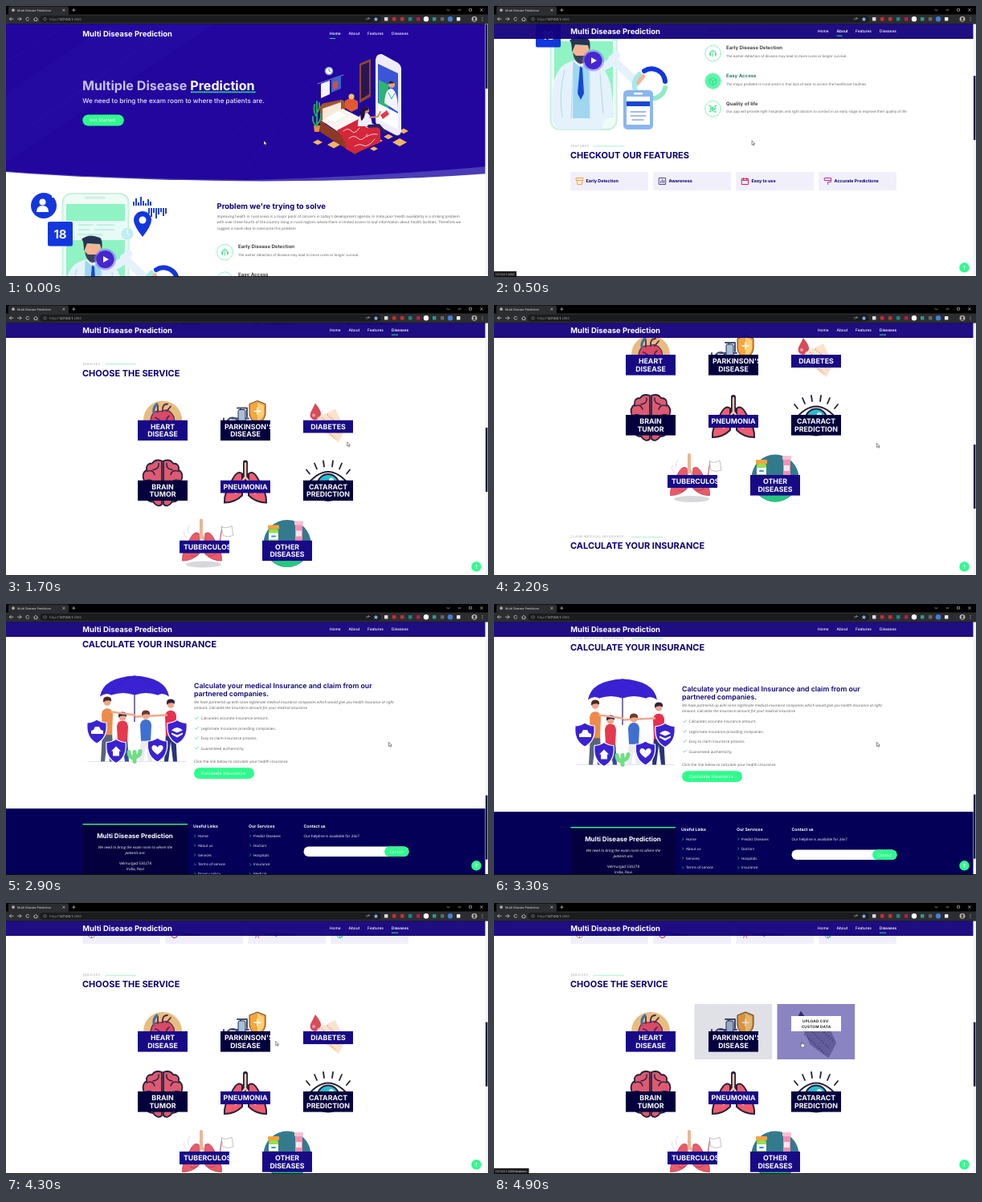
Write an HTML page that moves like this. It is 600x338 px and loops after 5 s.

```html
<!DOCTYPE html>
<html lang="en">
<head>
<meta charset="utf-8">
<title>Multi Disease Prediction</title>
<style>
html, body { margin: 0; width: 100%; height: 100%; overflow: hidden; background: #fff; }
svg { display: block; }
#stage { position: absolute; left: 0; top: 0; }
text { font-family: Inter, sans-serif; font-weight: 700; text-rendering: geometricPrecision; white-space: pre; }
.m { font-weight: 500; }
.s { font-weight: 600; }
.o { font-family: "Open Sans", sans-serif; font-weight: 400; }
.it { font-style: italic; }
.c { text-anchor: middle; }
</style>
</head>
<body>
<svg id="stage" width="600" height="338" viewBox="0 0 600 338"></svg>
<script>
const BLUE = '#22069e', INK = '#180a86', HEAD = '#0b0072', NAVY = '#04003d', GREEN = '#2ffb8d', GREY = '#5c5c5c';

// y is the middle of the line of text
const text = (x, y, str, size, fill = '#fff', cls = '', more = '') =>
  `<text x="${x}" y="${y + size * 0.36}" font-size="${size}" fill="${fill}" class="${cls}" ${more}>${str}</text>`;
const box = (x, y, w, h, fill, more = '') =>
  `<rect x="${x}" y="${y}" width="${w}" height="${h}" fill="${fill}" ${more}/>`;
const dot = (x, y, r, fill, more = '') => `<circle cx="${x}" cy="${y}" r="${r}" fill="${fill}" ${more}/>`;
const path = (d, fill, more = '') => `<path d="${d}" fill="${fill}" ${more}/>`;
const line = (d, color, w = 1) => path(d, 'none', `stroke="${color}" stroke-width="${w}" stroke-linecap="round" stroke-linejoin="round"`);
const at = (x, y, s) => `<g transform="translate(${x} ${y})">${s}</g>`;
const group = (id, s) => `<g id="${id}">${s}</g>`;
const pill = (x, y, w, h, fill) => box(x, y, w, h, fill, `rx="${h / 2}"`);

function browser() {
  const ext = ['#ddd', '#d8262c', '#c9302c', '#138a8a', '#c2184a', '#fff', '#2c9c8c', '#666', '#3f7fd8', '#eee'];
  return box(0, 0, 600, 22.3, '#000') + box(3, 0.5, 75, 11, '#2c2d30', 'rx="2"') + box(0, 10.5, 600, 11.8, '#2c2d30') +
    dot(9, 5.2, 1.9, '#aaa') + text(14, 5.3, 'Multi Disease Prediction', 3.75, '#eee', 'o') +
    line('M70.7 4l2.4 2.4m0-2.4l-2.4 2.4M82.5 5.2h3.6m-1.8-1.8v3.6', '#ddd', 0.6) +
    line('M563 5h3M577 3.6h2.6v2.6h-2.6zM590.5 3.6l2.8 2.8m0-2.8l-2.8 2.8M549 4.5l1.5 1.5 1.5-1.5', '#ddd', 0.6) +
    pill(42, 12, 425, 8.8, '#1b1c1e') +
    line('M9 16.2H4.5m2-2l-2 2 2 2M14.5 16.2H19m-2-2l2 2-2 2', '#ddd', 0.7) +
    line('M28.6 15.2a2 2 0 1 0 .1 2M34.5 16.5l2.5-2.3 2.5 2.3m-4.3 0v2h3.6v-2', '#ddd', 0.7) +
    dot(48.5, 16.3, 1.7, 'none', 'stroke="#aaa" stroke-width=".5"') +
    text(54, 16.3, 'http://<tspan fill="#fff">127.0.0.1</tspan>:2000', 4.1, '#999', 'o') +
    line('M449 17.5v-2h3.5m-1.3-1.3l1.3 1.3-1.3 1.3', '#aaa', 0.6) +
    path('M460.5 13.4l.9 2 2 .2-1.5 1.4.5 2-1.9-1-1.9 1 .5-2-1.5-1.4 2-.2z', '#8ab4f8') +
    ext.map((c, i) => i == 5 || i == 8 ? dot(473 + i * 10, 16.3, 3.2, c) : box(471 + i * 10, 14, 4.4, 4.6, c, 'rx=".6"')).join('') +
    dot(583, 16.3, 3.4, '#b9b4ad') + dot(583, 15.5, 1.3, '#222') + path('M580.6 18.6q2.4-3 4.8 0z', '#222') +
    [14.4, 16.3, 18.2].map(y => dot(593, y, 0.5, '#ccc')).join('');
}

function heroArt() {
  const gem = (x, y, r) => path(`M${x - r} ${y}l${r}-${r * 0.55} ${r} ${r * 0.55} -${r} ${r * 0.55}z`, '#f2b661');
  return gem(490, 170, 9) + gem(462, 168, 7) + gem(408, 173, 8) + gem(388, 170, 6) + gem(495, 156, 6) + gem(476, 163, 6) + gem(458, 178, 5) +
    path('M460 67q1-8 8-7l20 11q4 3 4 8v77q-1 7-7 5l-21-11q-4-3-4-7z', '#efedfb') +
    path('M463 72l25 12v63l-25-12z', '#3a55d8') + path('M464 92l12 6v31l-12-6z', '#2bb673') + path('M463 121l25 13v20l-25-12z', '#fff') +
    path('M471 121q1-18 9-18 8 3 8 29z', '#f4f4ff') + dot(480, 98, 4, '#e7a07d') + path('M476 97q2-6 8-1z', '#222') + line('M476 108l4 8 4-7', '#27b39f', 1) +
    path('M440 72l14-6v47l-14 8z', '#8a4a2c') + path('M442 74l10-4v40l-10 6z', '#2b1450') +
    line('M388 97l32-11', '#b9b0e8', 0.7) + path('M392 97l11-4v17l-11 5z', '#f3f3ff') + path('M405 92l12-5v16l-12 5z', '#3566c9') + path('M407 95l6-2v9l-6 3z', '#e4463d') +
    dot(402, 81, 5.3, '#8aa1f0') + dot(402, 81, 3.8, '#fff') + line('M402 78.5v2.5l2 1', '#333', 0.6) +
    path('M422 118l8-4 8 5v9l-8 4-8-5z', '#e2582f') + dot(430, 113, 3.5, '#f5c05d') +
    path('M391 126q2-5 6-5l20-4q4 0 5 4v12l-26 14h-5z', '#a5532f') + path('M394 128l23-8v14l-23 9z', '#f7ead8') +
    path('M391 143l43 28 31-17v14l-31 17-43-28z', '#8b3b24') + path('M393 143l26-15 44 22-29 21z', '#fbf5f2') +
    path('M397 140l17-10 11 6-17 10z', '#fff', 'stroke="#ddd" stroke-width=".5"') +
    path('M412 155l27-14 27 12v17l-32 14-11-6q1-9-11-23z', '#d5263a') +
    line('M420 156q6-5 10 0t10-4M427 165q6-5 11 0t12-5M438 149q5-3 9 1t10-1M434 175q6-4 11-1t14-8M449 163q5-4 13-3', '#fbd3d5', 1) +
    path('M438 150q0-16 8-18 9 1 10 18z', '#f1eefb') + dot(448, 130, 4.2, '#dc8e6d') + path('M441 135q0-10 8-10l3 4-5 2q0 10-5 12z', '#23123c') +
    line('M453 139l10-1 3-6', '#dc8e6d', 2) + line('M452 150l12-1 7 8', '#2a2266', 4) + path('M466 136l8-6 3 5-8 6z', '#e2384f') +
    path('M383 149h8l-1 8h-6z', '#ef8b46') + line('M387 150v-31M387 150q-6-4-5-12M387 148q6-6 5-14M387 138q-5-5-3-15M387 133q4-4 3-12', '#24b554', 1.8);
}

function hero() {
  return path('M0 20H600V209Q480 218 320 218.5 130 217 0 207z', '#4a3bb6') +
    path('M0 20H600V200Q470 212 300 217 120 215 0 206z', BLUE) +
    path('M0 110L130 22H260L0 195z', '#2c14a8', 'opacity=".3"') +
    line('M0 70L80 22M30 150L210 22M255 195L345 90M300 200L420 40', '#3a26b4', 0.25) +
    text(95, 99, 'Multiple Disease <tspan fill="#fff">Prediction</tspan>', 16.1, '#c6c0ea') +
    path('M230 107.4H311', 'none', `stroke="${GREEN}" stroke-width="1.7" stroke-dasharray="1.8 .5"`) +
    text(95.3, 118.5, 'We need to bring the exam room to where the patients are.', 8.1, '#eceafa', 'm') +
    pill(95.3, 135.5, 51.5, 14, GREEN) + text(104, 142.5, 'Get Started', 5, '#fff', 'm', 'letter-spacing=".4"') + heroArt();
}

function doctorArt() {
  const bars = [5, 9, 4, 11, 6, 3, 8, 5];
  return box(70.5, 234, 82, 168, '#eefcf6', 'rx="11" stroke="#c9efdf" stroke-width="2"') + box(75, 247, 73, 140, '#8ff3c4') +
    box(98, 237.5, 26, 3, '#d6ebe5', 'rx="1.5"') + box(75, 268, 73, 24, '#e6fbf5') + line('M90 273h18m5 0h22M90 279h14m6 0h24M90 285h30', '#9be4d6', 1) +
    dot(47, 249, 16, '#1237de') + dot(45.5, 244.5, 4, '#fff') + path('M38 257q0-8 7.5-8 7.5 0 7.5 8z', '#fff') + box(57, 232, 7, 7, '#fff') +
    box(52, 269, 31, 30.5, '#1237de', 'rx="2"') + text(67.5, 284.5, '18', 15, '#fff', 'c') +
    path('M170 288q-11-14-11-21a11 11 0 0 1 22 0q0 7-11 21z', '#1237de') + dot(170, 267, 4.5, '#fff') +
    bars.map((h, i) => box(158 + i * 3, 249 - h, 2, h, '#1d42d8') + box(177 + i * 3, 252, 2, h + 2, '#1d42d8')).join('') +
    dot(151, 284, 7.5, '#bdeef0') + line('M151 279v5l3 2', '#fff', 1) +
    path('M73 392q-5-55 13-70 15-10 31-5 20 0 28 28l5 40-14 6-2 11H80z', '#e5f2fb') +
    path('M99 317l9 8 10-9 1 72H98z', '#9ed7ef') + path('M107 323l3 2 2 32-4 8-4-8z', '#1748d2') + line('M88 328q-8 30-3 58M132 332l4 50M99 318l-3 70M119 318v70', '#b4d5e8', 1) +
    path('M98 296q0 20 9 25 9-3 11-23z', '#f4b594') + path('M97 306q0-14-3-15 9-8 23-2 4 3 2 15l-2-7-16-1z', '#293453') + path('M98 306l4 4h12l4-5q-1 14-10 15-8-1-10-14z', '#39435d') +
    line('M122 326q23-1 30-17M147 314l31 30', '#e5f2fb', 10) + line('M178 344l7-8', '#f4b594', 6) +
    dot(123.5, 316, 13.5, '#8a78ef', 'opacity=".6"') + dot(123.5, 316, 11, '#4526d2') + path('M121 312l7 4-7 4z', '#fff') +
    line('M183 361a17 17 0 0 1-2-28', '#a6e9ec', 6) + line('M187 329a17 17 0 0 1 26 13', '#1237de', 6) + line('M213 350a17 17 0 0 1-21 13', '#8feac6', 6) +
    box(161, 353, 37, 49, '#8ab6ef', 'rx="5"') + box(165, 361, 29, 35, '#fff') + box(165, 367, 29, 6, '#1748d2') + line('M170 380h19M170 385h19M172 390h14', '#4a7be0', 1) + box(174, 356, 11, 2.5, '#fff', 'rx="1"');
}

function about() {
  const rows = [
    ['Early Disease Detection', 'The earlier detection of disease may lead to more cures or longer survival.', 'M-4-1Q0-7 4-1M-3 3V0Q0-4 3 0V3M0 0V4M-4 2V0M4 2V0'],
    ['Easy Access', "The major problem in rural area's is that lack of ease to access the healthcare facilities", 'M-4-2L0-4 4-2V3L0 5-4 3ZM-4-2L0 0 4-2M0 0V5'],
    ['Quality of life', 'Our app will provide right hospitals and right doctors to contact in an early stage to improve their quality of life', 'M-4-4Q0-3 4 4 0 5-4-4M4-4Q4 0-4 4-4 0 4-4M-4 0H4']];
  const para = ["Improving health in rural areas is a major point of concern in today's development agenda. In India poor health availability is a striking problem",
    'with over three-fourth of the country living in rural regions where there is limited access to and information about health facilities. Therefore we',
    'suggest a novel idea to overcome this problem'];
  return doctorArt() + text(262.5, 249.3, "Problem we're trying to solve", 9.5, HEAD) +
    para.map((s, i) => text(262.5, 262.5 + i * 7.2, s, 4.56, GREY, 'o')).join('') +
    rows.map(([head, body, icon], i) => {
      const y = 307 + i * 34.6;
      return dot(272.5, y, 9.8, '#fff', `id="ring${i}" stroke="#8af5be" stroke-width="1"`) + at(272.5, y, line(icon, '#35dc8c', 0.9)) +
        text(289, y - 6.8, head, 6.05, '#444', '', `id="head${i}"`) + text(289, y + 3.7, body, 4.38, GREY, 'o');
    }).join('');
}

const section = (y, label, title, x1, x2) =>
  text(95.5, y, label, 3.85, '#999', 'o s', 'letter-spacing=".68"') + line(`M${x1} ${y + 0.4}H${x2}`, '#6fe8ad', 0.6) + text(95, y + 11.4, title, 10.98, HEAD);

function features() {
  const ring = 'M-4 0A4 4 0 1 1 4 0A4 4 0 1 1-4 0';
  const cards = [
    ['Early Detection', '#ffa331', 'M-4-4H4V-1H-4ZM-3-1V4H3V-1'], ['Awareness', '#54479b', 'M-4-4H4V4H-4ZM-2 2V0M0 2V-2M2 2V-1'],
    ['Easy to use', '#d0215f', 'M-4-3H4V4H-4ZM-4-1H4M-2-4V-2M2-4V-2'], ['Accurate Predictions', '#b635a2', 'M-4-4H4V-1H-4ZM4-2V1H0V4'],
    ['Recommendations', '#47aeff', 'M-3-3Q0-5 3-3V3Q0 5-3 3ZM-3-3Q0-1 3-3M-3 0Q0 2 3 0'], ['Doctors', '#ef7466', ring + 'M-1 0H1'],
    ['Hospitals', '#19d9a5', 'M-3-4H2V2H-3ZM-1 4H4V-2'], ['Medicals', '#4233e0', 'M-4 0L0-4 4 0V4H-4ZM-1 1H1'],
    ['Access to care', '#b2904f', 'M0-4V4M-4 0Q-4 4 0 4 4 4 4 0M-2-2H2'], ['Statistics', '#b20969', ring + 'M0 0L2-2'],
    ['Transportation', '#ee5a5c', 'M0-1L-2 4M0-1L2 4M-3-4Q-5-1-3 1M3-4Q5-1 3 1'], ['Multi Disease Prediction', '#29cc81', ring + 'M-4 0H4M0-4V4M-3-3L3 3']];
  const row = r => cards.slice(r * 4, r * 4 + 4).map(([name, color, icon], i) => {
    const x = 95.3 + i * 103, y = 455 + r * 29.5;
    return box(x, y, 96.7, 23, '#f1effa') + at(x + 11.3, y + 11.5, line(icon, color, 1)) + text(x + 19.2, y + 11.5, name, 5.42, HEAD);
  }).join('');
  return section(422.5, 'FEATURES', 'CHECKOUT OUR FEATURES', 124, 162) + [0, 1, 2].map(r => group('row' + r, row(r))).join('');
}

// Pictures sit around the middle of a service cell
const lungs = (fill, edge, w) => path('M-4-12Q-10-17-16-5-27 12-26 24-13 24-4 15zM4-12Q10-17 16-5 27 12 26 24 13 24 4 15z', fill, `stroke="${edge}" stroke-width="${w}"`);
const art = {
  heart: dot(0, 0, 24, '#e6bd7e') + path('M-15 0Q-13-13-2-11 8-16 14-4 17 9 2 21-11 14-15 0z', '#d84a67', 'stroke="#51284d" stroke-width="1.2"') +
    line('M-6-10V-18M0-11q-1-9 6-9M5-11l5-6M-9-3q8 3 10 12M8-5q-5 3-2 10', '#51284d', 1.8) + line('M-11-9q-1-7 4-11', '#3f6dae', 3),
  chair: line('M-27-2V22M-24 23H26M-6-15V10M-10-15H2V-4M-17-2H4', '#45506e', 2) + box(-9, -13, 9, 20, '#a9bfd7', 'rx="2" stroke="#25304d"') + dot(-16, 4, 7, 'none', 'stroke="#45506e" stroke-width="2"') +
    path('M15-24L25-20V-8Q24 1 15 5 6 1 5-8V-20z', '#f5a63c', 'stroke="#59432f" stroke-width="1"') + path('M15-22L23-18V-8Q22-2 15 2z', '#ffd078') + line('M15-15v8m-4-4h8', '#fff', 1.5),
  drop: path('M-16-21Q-8-11-9-7-11 0-17 0-24-2-22-9z', '#d94b59') + dot(-18, -6, 2, '#f49aa1') + path('M-14-3L9-14 21 12 13 28-6 14z', '#f9dcc1', 'opacity=".8"') +
    path('M-8-3L14 18M-1-7L18 10M-12 3L10 24', 'none', 'stroke="#e89b62" stroke-width="2" stroke-dasharray="1 2"'),
  brain: path('M-1-28Q-9-31-13-25-21-25-20-17-27-12-23-3-28 6-21 12-21 23-12 23-6 31-1 26zM1-28Q9-31 13-25 21-25 20-17 27-12 23-3 28 6 21 12 21 23 12 23 6 31 1 26z', '#dc5a72', 'stroke="#262039" stroke-width="1.8"') +
    line('M-5-25q1 7-7 8M-20-15q8-3 10 4M-22-3q8-4 12 4M-19 11q7-6 13 0M-11 22q0-7 6-7M5-25q-1 7 7 8M20-15q-8-3-10 4M22-3q-8-4-12 4M19 11q-7-6-13 0M11 22q0-7-6-7', '#262039', 1.4),
  lungs: line('M0-26V-8L-9 4M0-8L9 4', '#262039', 6) + lungs('#ef5d70', '#262039', 2) + line('M0-25V-8L-9 4M0-8L9 4M-12 0v12M12 0v12', '#fbc9aa', 2.5),
  eye: line('M-23-12l-4-5M-14-18l-3-7M-5-21l-1-7M5-21l1-7M14-18l3-7M23-12l4-5', '#262039', 1.8) +
    path('M-28 4Q0-33 28 4 0 39-28 4z', '#fff', 'stroke="#262039" stroke-width="2"') + dot(0, 2, 13.5, '#2cbcd0', 'stroke="#262039" stroke-width="2"') + dot(0, 2, 6, '#262039') + dot(4, -4, 3, '#d7fbff'),
  sick: '<ellipse cx="-1" cy="28" rx="22" ry="4" fill="#d8d8db"/>' + line('M-4-27V-8L-10 2M-4-8L5 2', '#e8b698', 4) + at(-3, 1, `<g transform="scale(.94)">${lungs('#e85c69', '#c2384d', 0.8)}</g>`) +
    dot(-13, 4, 2, '#fff') + dot(8, 4, 2, '#fff') + line('M-17 17q5 3 9-1M5 17q5 2 9-2M18 8L22-19', '#b8434f', 1) + path('M21-19q6 3 13-1l2 12q-7 3-13 0z', '#fff', 'stroke="#999" stroke-width=".6"') + line('M-22-5q-5-3-3-9m5 3q-2-6 2-10', '#c7c7c7', 0.6),
  pills: dot(0, 0, 29.5, '#347a8d') + path('M-25 14Q0 24 25 14 15 29 0 29.5-16 29-25 14z', '#24c97d') +
    box(-24, -23, 14, 5, '#f3a441', 'rx="1"') + box(-23, -18, 12, 26, '#98df49', 'rx="2"') + box(-23, -13, 12, 8, '#fff') + line('M-19-9h4', '#3c8ed2', 2) +
    box(10, -26, 9, 27, '#f391b2', 'rx="2"') + box(9, -28, 11, 5, '#f9c0d2', 'rx="1"') + box(11, -16, 7, 7, '#ffe4ef')
};
const services = [
  [195, 646, 'heart', INK, ['HEART', 'DISEASE'], 0], [298, 646, 'chair', NAVY, ["PARKINSON'S", 'DISEASE'], 1], [401, 646, 'drop', INK, ['DIABETES'], 0],
  [195, 725, 'brain', NAVY, ['BRAIN', 'TUMOR'], 0], [298, 725, 'lungs', INK, ['PNEUMONIA'], 0], [401, 725, 'eye', NAVY, ['CATARACT', 'PREDICTION'], 0],
  [247, 798, 'sick', INK, ['TUBERCULOSIS'], 1], [350, 800, 'pills', INK, ['OTHER', 'DISEASES'], 0]];

function service([x, y, pic, color, words, long], i) {
  const top = i < 3 ? 646 : i < 6 ? 721 : 796, h = words.length * 9.6 + 6.6;
  const lines = words.map((w, j) => long && !j ? text(5, 8, w, 8.8) : text(31, 8 + j * 9.6, w, 8.8, '#fff', 'c')).join('');
  const tip = (dy, s) => text(x, top - dy, s, 4.7, '#222', 'c', 'letter-spacing=".2"');
  return `<g id="pic${i}">${at(x, y, art[pic])}</g>` + box(x - 48.5, top - 34, 96.7, 69, color, `id="veil${i}" opacity="0"`) +
    `<svg id="name${i}" x="${x - 31}" y="${top}" width="62" height="${h}">${box(0, 0, 62, h, color)}${lines}</svg>` +
    `<g id="tip${i}" opacity="0">${box(x - 31, top - 19, 62, 19, '#fff')}${tip(12.4, 'UPLOAD CSV:')}${tip(5.6, 'CUSTOM DATA')}</g>`;
}

function familyArt() {
  const purple = '#3a22d2';
  const shield = (x, y, icon) => path(`M${x} ${y - 15}q6 4 12 4 2 19-12 26-14-7-12-26 6 0 12-4z`, purple, 'stroke="#fff" stroke-width="1.2"') + at(x, y, icon);
  const person = (x, y, h, shirt, legs, hair) => path(`M${x - 6} ${y + h * 0.5}h12l2 ${h * 0.5}h-5l-3-${h * 0.35}-3 ${h * 0.35}h-5z`, legs) +
    path(`M${x - 6} ${y + h * 0.55}l-1-${h * 0.35}q1-7 7-7t7 7l-1 ${h * 0.35}z`, shirt) + dot(x, y, 4.3, '#f0a78c') + path(`M${x - 5} ${y}q-1-7 5-7t5 6q-5-3-10 1z`, hair);
  const house = path('M-6 0L0-6 6 0H4V6H-4V0z', '#fff'), heart = path('M0 6Q-11-2-5-6-1-6 0-3 1-6 5-6 11-2 0 6z', '#fff'), car = path('M-7 3V-1l3-1 2-4h5l2 4 3 1v4z', '#fff');
  return line('M103 196H224', '#d6d2f3', 0.7) + line('M160 90V146', '#2d1a5c', 1.2) + person(126, 122, 74, '#ee8a4c', '#5a6478', '#4e291f') + person(205, 125, 71, '#e8304e', '#28337c', '#33203a') +
    person(145, 141, 55, '#e6384e', '#334a9c', '#33203a') + person(174, 139, 57, '#3f6fd0', '#e9eaf4', '#6e392b') + line('M131 134l29 4M200 138l-38 2', '#f0a78c', 2.5) +
    path('M117 115Q121 91 160 89 199 91 203 115 196 109 189 113 174 108 160 113 146 108 131 113 124 109 117 115z', purple) +
    line('M131 113Q138 95 160 89 182 95 189 113', '#2d17b4', 0.5) +
    line('M160 196v-12M160 192q-7-1-7-8M160 191q7-2 7-8', '#70df82', 5) + shield(113, 158.5, car) + shield(137, 183, house) + shield(188.5, 181.5, heart) + shield(213, 159, path('M-7-2q7-7 14 0l-7 3zM-7 3l7 4 7-4v-2l-7 3-7-3z', '#fff'));
}

function insurance() {
  const list = ['Calculates accurate insurance amount.', 'Legitimate insurance providing companies.', 'Easy to claim insurance process.', 'Guaranteed authenticity.'];
  return at(0, 834.5, familyArt() + text(234, 101, 'Calculate your medical Insurance and claim from our', 8.74, HEAD, 's') + text(234, 111, 'partnered companies.', 8.74, HEAD, 's') +
    text(234, 122, 'We have partnered up with some legitimate medical insurance companies which would give you health insurance at right', 4.7, GREY, 'o it') +
    text(234, 129, 'amount. Calculate the Insurance amount for your medical insurance', 4.7, GREY, 'o it') +
    list.map((s, i) => line(`M235.5 ${142 + i * 12.4}l1.3 1.3 2.5-2.8`, '#3fd996', 0.8) + text(242.5, 142.3 + i * 12.4, s, 4.7, GREY, 'o')).join('') +
    text(234, 195.5, 'Click the link below to calculate your health insurance', 4.7, GREY, 'o') +
    pill(234, 203.8, 75, 13.6, GREEN) + text(243, 210.6, 'Calculate Insurance', 4.95, '#fff', 'm', 'letter-spacing=".45"'));
}

function footer() {
  const column = (x, head, items) => text(x, 277, head, 5.15) + items.map((s, i) =>
    line(`M${x + 1.6} ${287.5 + i * 11.9}l1.2 1.2-1.2 1.2`, GREEN, 0.6) + text(x + 6, 288.6 + i * 11.9, s, 4.48, '#fff', 'o')).join('');
  const mid = (y, s, it) => text(161, y, s, 4.6, '#fff', 'o c ' + it);
  return at(0, 834.5, box(0, 254.6, 600, 170, '#040057') + box(95.5, 273.5, 130.5, 92, NAVY) + box(95.5, 273.5, 130.5, 1.4, GREEN) +
    text(160.5, 288.6, 'Multi Disease Prediction', 8, '#fff', 'c') +
    mid(303, 'We need to bring the exam room to where the', 'it') + mid(310.3, 'patients are.', 'it') + mid(323, 'Velmurgad 530278', '') + mid(330.3, 'India, Rovi', '') +
    column(233, 'Useful Links', ['Home', 'About us', 'Services', 'Terms of service', 'Privacy policy']) +
    column(302, 'Our Services', ['Predict Diseases', 'Doctors', 'Hospitals', 'Insurance', 'Medical']) +
    text(370.5, 277, 'Contact us', 5.15) + text(370.5, 289.2, 'Our helpline is available for 24x7', 4.55, '#fff', 'o') +
    pill(370.5, 302, 131, 12.5, '#fff') + pill(471, 302, 30.6, 12.5, GREEN) + text(486.3, 308.3, 'Contact', 4.9, '#fff', 'o c'));
}

const links = [['Home', 403, 7], ['About', 426.5, 7], ['Features', 450, 8], ['Diseases', 480, 8]];
const nav = box(0, 18, 597, 23, '#13007c', 'id="bar" opacity=".95"') + group('menu', text(95.3, 31.5, 'Multi Disease Prediction', 9.45) +
  links.map(([s, x, w], i) => text(x, 31.3, s, 4.8, '#fff', 'm', `id="link${i}"`) + box(x, 36.7, w, 0.9, GREEN, `id="mark${i}"`)).join(''));

const stage = document.getElementById('stage');
stage.innerHTML = box(0, 0, 600, 338, '#fff') +
  group('page', hero() + about() + features() +
    group('services', section(575.8, 'SERVICES', 'CHOOSE THE SERVICE', 124, 161) + services.map(service).join('')) +
    section(873, 'CLAIM MEDICAL INSURANCE', 'CALCULATE YOUR INSURANCE', 172, 210) + insurance() + footer()) +
  nav + group('up', dot(585.5, 326.3, 6.2, GREEN) + line('M585.5 328.5v-4.5m-1.7 1.7l1.7-1.7 1.7 1.7', '#fff', 0.7)) +
  box(596.5, 22, 3.5, 316, '#f4f4f6') + box(597, 23, 2.4, 80, NAVY, 'id="thumb"') +
  group('status', box(0, 330.8, 28, 7.2, '#1b1b1d', 'id="plate"') + text(1.5, 334.3, '', 3.55, '#eee', 'o', 'id="address"')) +
  box(0, 337, 600, 1, '#111') + browser() +
  group('arrow', path('M0 0V5.2L1.3 4.1 2.2 6 3.1 5.6 2.2 3.8H3.8z', '#fff', 'stroke="#222" stroke-width=".5"')) +
  group('hand', path('M-.5 0q.8-.6 1.1 0v2.2l2.5.6q.9.4.6 1.6l-.6 2.2H.1l-1.9-2.8q.2-.9 1.3 0z', '#fff', 'stroke="#222" stroke-width=".5"'));

const $ = {};
stage.querySelectorAll('[id]').forEach(el => $[el.id] = el);
const set = (id, name, value) => $[id].setAttribute(name, value);
const show = (id, on) => set(id, 'visibility', on ? 'visible' : 'hidden');

const scrolls = [[0, 0], [100, 35], [300, 120], [400, 165], [500, 248], [800, 345], [1200, 421], [2200, 584], [2500, 665], [2900, 834], [3100, 885], [3300, 830], [3600, 665], [3800, 579], [4200, 486], [5000, 486]];
const xs = [[0, 321], [1300, 321], [1900, 476.5], [4200, 476.5], [4400, 195], [4600, 200], [4700, 298], [4800, 310], [4900, 383]];
const ys = [[0, 168], [1300, 168], [1900, 172.3], [4200, 172.3], [4900, 173.3]];
const hovers = [[0, 4400, 4700, 'heart'], [1, 4700, 4900, 'parkinsons'], [2, 4900, 5000, 'diabetes']];

function track(keys, t) {
  const i = keys.findIndex(k => k[0] > t);
  if (i < 0) return keys[keys.length - 1][1];
  const [t0, a] = keys[i - 1], [t1, b] = keys[i];
  return a + (b - a) * (t - t0) / (t1 - t0);
}

function draw(t) {
  const y = track(scrolls, t), down = y > 30;
  set('page', 'transform', `translate(0 ${-y})`);
  set('thumb', 'y', 23 + y * 0.2586);
  set('menu', 'transform', `translate(0 ${down ? 0 : 3.4})`);
  show('bar', down);
  show('up', down);
  const active = [138, 321, 470, 771].filter(v => y >= v).length;
  links.forEach((_, i) => {
    show('mark' + i, i == active);
    $['link' + i].style.fontWeight = i == active ? 600 : 500;
  });

  const easy = t >= 400 && t < 600;
  set('ring1', 'fill', easy ? '#5df5a8' : '#fff');
  set('head1', 'fill', easy ? '#2a7d68' : '#444');
  show('row1', t >= 600);
  show('row2', t >= 700);
  show('services', t >= 700);

  let link = easy ? '' : null;
  for (const [i, from, to, name] of hovers) {
    const on = t >= from && t < to, k = on ? 1 : t >= to && t < to + 100 ? 0.24 : 0;
    if (on) link = '/' + name;
    const [cx, cy] = services[i];
    set('veil' + i, 'opacity', k / 2);
    set('name' + i, 'opacity', on ? 0 : 1);
    set('tip' + i, 'opacity', on ? 1 : 0);
    set('pic' + i, 'transform', on ? `translate(${cx} ${cy}) scale(1.2) translate(${-cx} ${-cy})` : '');
    $['pic' + i].style.filter = on ? 'grayscale(1) brightness(.7)' : 'none';
  }
  show('status', link !== null);
  $.address.textContent = '127.0.0.1:2000' + (link || '');
  set('plate', 'width', link ? 30 + link.length * 1.5 : 28);

  const pos = `translate(${track(xs, t)} ${track(ys, t)})`;
  set('arrow', 'transform', pos);
  set('hand', 'transform', pos);
  show('arrow', !link);
  show('hand', link);
}

const start = performance.now();
function tick() {
  const t = (performance.now() - start) % 5000;
  draw(Math.floor(t / 100) * 100);
  requestAnimationFrame(tick);
}
tick();
</script>
</body>
</html>
```
